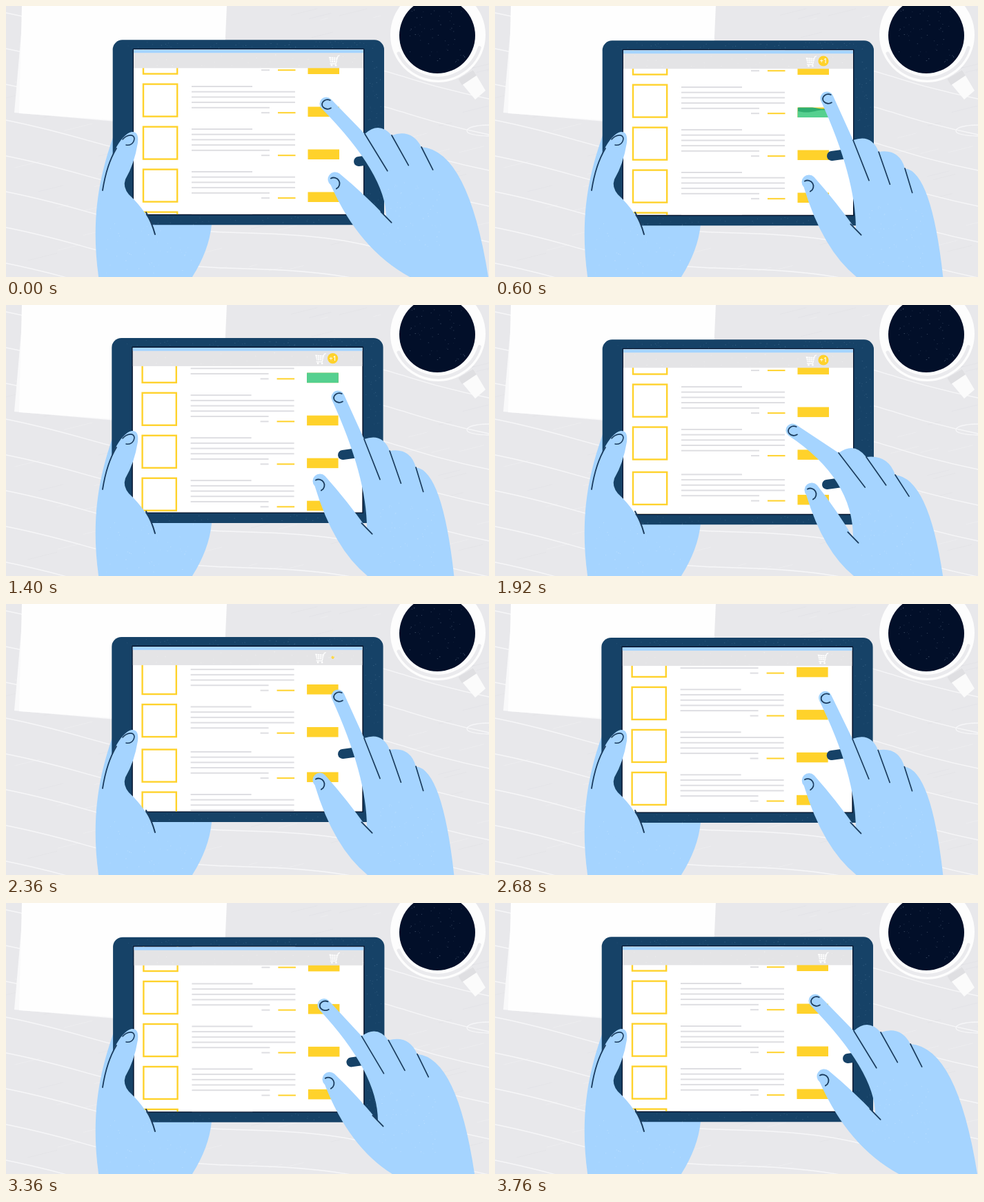
An HTML page with a canvas for the animation above (3800 ms loop, 700 by 394 pixels).

```html
<!DOCTYPE html>
<html lang="en">
<head>
<meta charset="utf-8">
<title>Tablet shopping</title>
<style>
html, body { margin: 0; width: 100%; height: 100%; overflow: hidden; background: #e8e8eb; }
canvas { display: block; width: 700px; height: 394px; }
</style>
</head>
<body>
<canvas id="stage" width="700" height="394"></canvas>
<script>
const ctx = document.getElementById('stage').getContext('2d');
const LOOP = 3800;
const SKIN = '#a5d4ff', NAVY = '#164267', INK = '#1b3c5e', YELLOW = '#ffd22b';
const GREEN = '#55d08f', DEEP_GREEN = '#2fae70', GREY = '#e4e4e6', LINE = '#dedee2';

const span = (t, a, b) => Math.max(0, Math.min(1, (t - a) / (b - a)));
const cubic = u => u < 0.5 ? 4 * u ** 3 : 1 - 4 * (1 - u) ** 3;
const backOut = u => 1 + 2.7 * (u - 1) ** 3 + 1.7 * (u - 1) ** 2;
const ease = (t, a, b) => (1 - Math.cos(Math.PI * span(t, a, b))) / 2;
const toward = (a, b) => Math.atan2(b[1] - a[1], b[0] - a[0]);
const polar = ([x, y], angle, r) => [x + r * Math.cos(angle), y + r * Math.sin(angle)];

// Right hand poses: a few joints, the outline is derived from them.
const RAISED = {
  tip: [464, 142], knuckles: [[520, 186], [559, 188], [602, 205]], heel: [700, 400],
  cuff: [597, 400], thumb: [477, 252], web: [551, 307], shade: [511, 226] };
const UPPER = {
  tip: [481, 134], knuckles: [[519, 195], [556, 212], [594, 236]], heel: [650, 400],
  cuff: [532, 400], thumb: [455, 256], web: [523, 325], shade: [488, 218] };
const LOWER = {
  tip: [431, 182], knuckles: [[498, 215], [538, 221], [580, 247]], heel: [650, 400],
  cuff: [528, 400], thumb: [459, 269], web: [519, 338], shade: [481, 261] };

function mix(a, b, u) {
  if (typeof a === 'number') return a + (b - a) * u;
  if (Array.isArray(a)) return a.map((v, i) => mix(v, b[i], u));
  return Object.fromEntries(Object.keys(a).map(k => [k, mix(a[k], b[k], u)]));
}

const raised = t => 1 - ease(t, 60, 330) + ease(t, 3050, 3600);
const lowered = t => 0.5 - 0.5 * ease(t, 330, 600)
  + ease(t, 800, 1060) - ease(t, 1060, 1390)
  + ease(t, 1500, 1900) - ease(t, 2030, 2350) + 0.5 * ease(t, 2600, 3000);
const pushed = t => ease(t, 1060, 1390) - ease(t, 1500, 1900)
  + ease(t, 2030, 2350) - ease(t, 2500, 2900);

function random(seed) {
  return () => (seed = (seed * 16807) % 2147483647) / 2147483647;
}
function bar(color, x, y, w, h) {
  ctx.fillStyle = color;
  ctx.fillRect(x, y, w, h);
}
function disc(c, color, x, y, r) {
  c.beginPath();
  c.arc(x, y, r, 0, 7);
  c.fillStyle = color;
  c.fill();
}
function shape(c, color, path) {
  c.fillStyle = color;
  c.fill(new Path2D(path));
}
function stroke(c, color, width, path) {
  c.strokeStyle = color;
  c.lineWidth = width;
  c.stroke(new Path2D(path));
}
function line(color, width, a, b) {
  stroke(ctx, color, width, `M${a}L${b}`);
}
function specks(c, color, count, seed, x, y, w, h) {
  const rnd = random(seed);
  c.fillStyle = color;
  for (let i = 0; i < count; i++) c.fillRect(x + rnd() * w, y + rnd() * h, 0.5 + rnd(), 0.5 + rnd() * 0.7);
}

function makeDesk() {
  const layer = document.createElement('canvas');
  layer.width = 700;
  layer.height = 394;
  const c = layer.getContext('2d');
  c.lineCap = 'round';
  c.fillStyle = '#e8e8eb';
  c.fillRect(0, 0, 700, 394);

  const rnd = random(71);
  for (let i = 0; i < 90; i++) {
    const x = rnd() * 700, y = rnd() * 394, len = 8 + rnd() * 35;
    stroke(c, i % 2 ? 'rgba(255,255,255,.25)' : 'rgba(205,205,211,.2)', 0.8,
      `M${x} ${y}l${len} ${-len * 0.25}`);
  }
  for (let y = 10; y < 394; y += 52) {
    stroke(c, 'rgba(250,250,251,.85)', 1.3, `M0 ${y}C150 ${y + 30} 150 ${y + 55} 350 ${y + 60}S550 ${y + 95} 700 ${y + 125}`);
  }
  stroke(c, 'rgba(250,250,251,.85)', 1.3, 'M700 173C660 173 655 189 700 189');

  shape(c, '#f9f9fa', 'M22 40L12 155L160 168L200 40Z');
  shape(c, '#fefefe', 'M23 0H320L316 90L160 166L19 156Z');

  shape(c, '#fbfbfb', 'M655 106L677 93L695 123L680 136Z');
  shape(c, '#dfdfe2', 'M655 106L677 93L682 101L661 115Z');
  disc(c, '#fdfdfd', 626, 42, 69);
  c.beginPath();
  c.arc(626, 42, 63, 0.3, 2.7);
  c.strokeStyle = 'rgba(225,225,229,.65)';
  c.lineWidth = 5;
  c.stroke();
  disc(c, '#020f29', 625, 43, 55);
  specks(c, 'rgba(150,165,190,.35)', 60, 19, 585, 4, 80, 78);
  return layer;
}
const desk = makeDesk();

function drawLeftPalm() {
  shape(ctx, SKIN, 'M156 188C140 235 120 300 135 400H266Q294 358 298 318V280Z');
}

function drawLeftThumb() {
  shape(ctx, SKIN, `M140 268C148 220 166 187 182 183Q193 182 191 199Q186 230 173 252
    Q169 263 178 274Q206 300 217 332L200 350L131 320Z`);
  stroke(ctx, INK, 1.8, 'M140 268Q146 230 160 207');
  stroke(ctx, INK, 2, 'M203 300Q211 314 216 332');
  stroke(ctx, INK, 1.6, 'M169 194C176 186 186 186 186 193C185 201 179 203 174 202');
  specks(ctx, 'rgba(225,242,255,.35)', 50, 53, 145, 310, 130, 80);
}

function drawRow(y, fill) {
  ctx.strokeStyle = YELLOW;
  ctx.lineWidth = 2.4;
  ctx.strokeRect(199, y + 1.2, 49.2, 47);
  for (let i = 0; i < 5; i++) bar(LINE, 269, y + 3.6 + i * 7.7, i === 0 ? 88 : i === 4 ? 113 : 150, 2);
  bar(LINE, 370, y + 41.8, 12, 2);
  bar(YELLOW, 394, y + 41.8, 25.5, 2);
  bar(YELLOW, 437.5, y + 34.1, 45.5, 14.5);
  if (fill > 0) drawFill(437.5, y + 34.1, 45.5, 14.5, fill);
}

// Two waves rise through the button, the darker one ahead.
function drawFill(x, y, w, h, fill) {
  ctx.save();
  ctx.beginPath();
  ctx.rect(x, y, w, h);
  ctx.clip();
  for (const [color, lag] of [[DEEP_GREEN, 0], [GREEN, 6]]) {
    const top = y + h - 22 * fill + lag * (1.5 - fill);
    ctx.beginPath();
    ctx.moveTo(x, y + h);
    for (let dx = 0; dx <= w + 1; dx += 1.5) {
      ctx.lineTo(x + dx, top + 1.7 * Math.sin(dx / 8 + lag / 2 + fill * 5));
    }
    ctx.lineTo(x + w + 2, y + h);
    ctx.fillStyle = color;
    ctx.fill();
  }
  ctx.restore();
}

function drawCart(x, y) {
  ctx.save();
  ctx.translate(x, y);
  shape(ctx, '#fff', 'M-7-5L5.5-4L3.5 3H-5Z');
  stroke(ctx, '#fff', 1.3, 'M8-7L6-6L3 5H-5');
  stroke(ctx, GREY, 0.7, 'M-3.5-5V3M-.5-5V3M2.5-5V3M-7-2H5M-7 .6H5');
  disc(ctx, '#fff', -3, 7.3, 1.3);
  disc(ctx, '#fff', 3, 7.3, 1.3);
  ctx.restore();
}

function drawBadge(scale) {
  if (scale <= 0) return;
  ctx.save();
  ctx.translate(475, 79);
  ctx.scale(scale, scale);
  disc(ctx, YELLOW, 0, 0, 7.6);
  ctx.fillStyle = '#fff';
  ctx.font = '600 9.5px "Open Sans", sans-serif';
  ctx.textAlign = 'center';
  ctx.textBaseline = 'middle';
  ctx.fillText('+1', 0, 0.5);
  ctx.restore();
}

function drawTablet(t) {
  const sway = 1 - raised(t) - 2.4 * pushed(t);
  const scroll = 248 * cubic(span(t, 1054, 2014)) + 251.5 * cubic(span(t, 2020, 3140));
  ctx.save();
  ctx.translate(sway, sway);
  ctx.beginPath();
  ctx.roundRect(154.7, 49.3, 393.3, 269, 14);
  ctx.fillStyle = NAVY;
  ctx.fill();
  specks(ctx, 'rgba(120,155,185,.3)', 60, 31, 160, 51, 380, 10);
  specks(ctx, 'rgba(120,155,185,.3)', 60, 47, 522, 60, 23, 245);
  specks(ctx, 'rgba(120,155,185,.3)', 30, 83, 210, 306, 320, 10);
  bar('#06142d', 183.8, 61.9, 335.5, 242.3);

  ctx.save();
  ctx.beginPath();
  ctx.rect(185, 63.4, 333, 239.4);
  ctx.clip();
  bar('#fff', 185, 63, 333, 241);
  for (let n = -1; n < 13; n++) {
    // The list is built from two blocks with a slightly wider seam.
    const y = 112.4 + 62 * n + (n > 5 ? 3.5 : 0) - scroll;
    if (y > 30 && y < 310) drawRow(y, n === 0 ? span(t, 380, 720) : 0);
  }
  bar(GREY, 185, 63, 333, 27.3);
  bar(SKIN, 185, 63, 333, 5.2);
  specks(ctx, 'rgba(255,255,255,.4)', 35, 11, 185, 70, 333, 20);

  drawCart(475 - 18.5 * (ease(t, 300, 480) - ease(t, 2380, 2620)), 79);
  drawBadge(t < 400 ? 0 : backOut(span(t, 400, 580)) - cubic(span(t, 2215, 2460)));
  ctx.restore();
  ctx.restore();
}

function handOutline({ tip, knuckles, heel, cuff, thumb, web }, fingerAngle, thumbAngle) {
  const path = new Path2D();
  const [k1, k2, k3] = knuckles;
  const under = polar(tip, fingerAngle + Math.PI / 2, 9.5);
  const pad = polar(thumb, thumbAngle + Math.PI / 2, 10.5);
  const knuckle = (a, b) => {
    const mid = mix(a, b, 0.5);
    path.quadraticCurveTo(...polar(mid, toward(a, b) - Math.PI / 2, 20), ...b);
  };
  const cap = (p, r, angle) => path.arc(...p, r, angle + Math.PI / 2, angle + Math.PI * 1.5);

  path.moveTo(...web);
  path.quadraticCurveTo(web[0], under[1] + (web[0] - under[0]) * Math.tan(fingerAngle), ...under);
  cap(tip, 9.5, fingerAngle);
  path.lineTo(...k1);
  knuckle(k1, k2);
  knuckle(k2, k3);
  path.quadraticCurveTo(k3[0] + 0.7 * (heel[0] - k3[0]), k3[1] + 5, ...heel);
  path.lineTo(...cuff);
  path.quadraticCurveTo(pad[0] + 0.35 * (cuff[0] - pad[0]), pad[1] + 0.72 * (cuff[1] - pad[1]), ...pad);
  cap(thumb, 10.5, thumbAngle);
  path.quadraticCurveTo(...polar(mix(thumb, web, 0.5), thumbAngle - Math.PI / 2, 8), ...web);
  return path;
}

function drawRightHand(t) {
  const pose = mix(mix(UPPER, LOWER, lowered(t)), RAISED, raised(t));
  const { tip, knuckles, thumb, web, shade } = pose;
  const fingerAngle = toward(tip, knuckles[0]) + 0.13;

  line(NAVY, 14, shade, [shade[0] + 22, shade[1] - 3]);
  ctx.fillStyle = SKIN;
  ctx.fill(handOutline(pose, fingerAngle, toward(thumb, web)));

  const creaseAngle = (fingerAngle + 1.25) / 2;
  knuckles.forEach((k, i) => line(INK, 1.7, k, polar(k, creaseAngle + i * 0.04, 63 - i * 13)));
  line(INK, 1.8, polar(web, 0.8, -11), polar(web, 0.8, 11));

  ctx.lineWidth = 1.8;
  ctx.strokeStyle = INK;
  ctx.beginPath();
  ctx.ellipse(tip[0] + 2, tip[1] + 1, 8, 6.8, 0, 0.9, 5.2);
  ctx.stroke();
  ctx.beginPath();
  ctx.arc(thumb[0] - 2, thumb[1] + 6, 8.5, -2.1, 1.1);
  ctx.stroke();

  specks(ctx, 'rgba(225,242,255,.35)', 60, 97, knuckles[2][0] - 55, knuckles[2][1] + 50, 85, 100);
}

function draw(now) {
  const t = now % LOOP;
  ctx.lineCap = 'round';
  ctx.drawImage(desk, 0, 0);
  drawLeftPalm();
  drawTablet(t);
  drawLeftThumb();
  drawRightHand(t);
}

let start;
function tick(now) {
  start ??= now;
  draw(now - start);
  requestAnimationFrame(tick);
}
draw(0);
requestAnimationFrame(tick);
</script>
</body>
</html>
```
